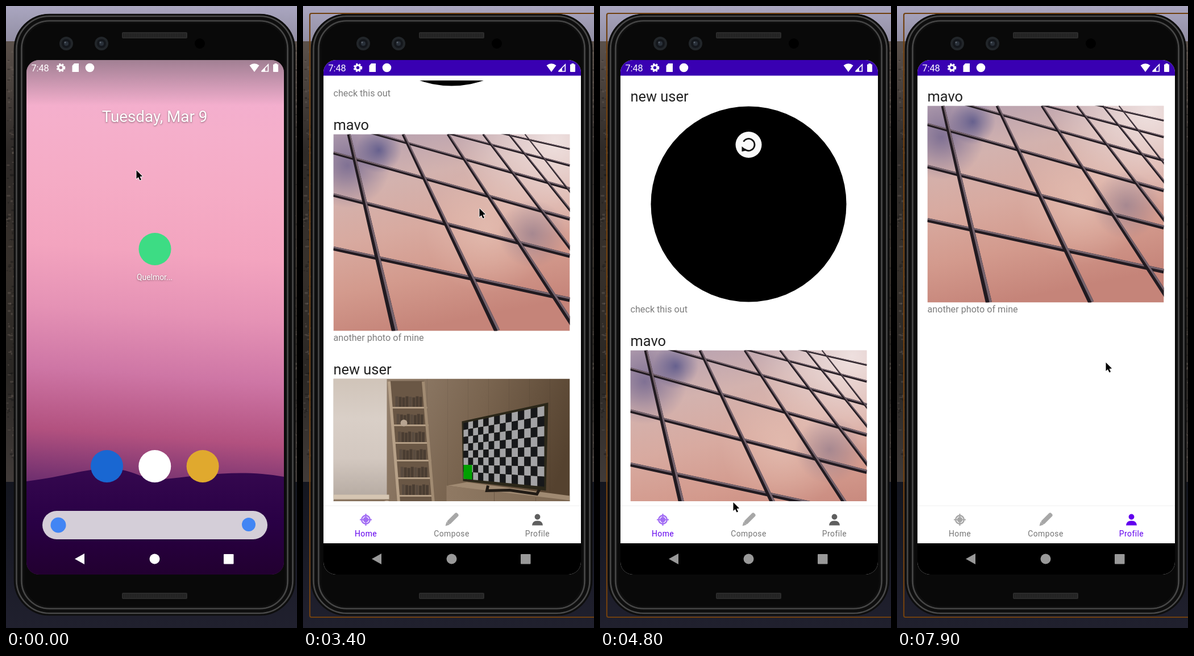
An HTML page with a canvas for the animation above (8000 ms loop, 512 px wide and 1094 px high).

```html
<!DOCTYPE html>
<html lang="en">
<head>
<meta charset="utf-8">
<title>Phone demo</title>
<style>
html, body { margin: 0; width: 100%; height: 100%; overflow: hidden; background: #17171f; }
canvas { display: block; width: 512px; height: 1094px; }
</style>
</head>
<body>
<canvas id="stage" width="512" height="1094"></canvas>
<script>
const c = document.getElementById('stage').getContext('2d');
const LOOP = 8000, STEP = 100;
const SCREEN = { x: 36, y: 95, w: 453, h: 905 };
const PHOTO = { x: 53.5, y: 175.5, w: 416, h: 346 };
const PURPLE = '#6200ee', BAR = '#3900b2', USER = 'mavo';
const clamp = v => Math.max(0, Math.min(1, v));
const mix = (a, b, p) => a + (b - a) * p;
const span = (t, from, to) => clamp((t - from) / (to - from));
const easeOut = p => 1 - (1 - p) ** 2;

// Pointer moves: start, end, then the place it reaches
const MOVES = [
  [100, 400, 257, 425], [1200, 1500, 285, 640], [1500, 2000, 312, 735], [3100, 3400, 310, 355],
  [3400, 4000, 300, 157], [4100, 4800, 234, 872], [4900, 5200, 262, 904], [5400, 5700, 249, 667],
  [5900, 6000, 257, 691], [6100, 6700, 416, 908], [7000, 7200, 367, 626]
];
const pointerAt = t => MOVES.reduce(([x, y], [from, to, nx, ny]) => {
  const p = span(t, from, to);
  return [mix(x, nx, p), mix(y, ny, p)];
}, [229, 288]);

// Drag, fling to the end, then drag back to the top
const scrollAt = t => (380 * span(t, 3100, 3400) + 161 * easeOut(span(t, 3400, 4000))) * (1 - span(t, 4100, 4650));

function gradient(x0, y0, x1, y1, ...colors) {
  const g = c.createLinearGradient(x0, y0, x1, y1);
  colors.forEach((color, i) => g.addColorStop(i / (colors.length - 1), color));
  return g;
}
function box(x, y, w, h, r, fill) {
  c.fillStyle = fill; c.beginPath(); c.roundRect(x, y, w, h, r); c.fill();
}
function outline(x, y, w, h, r, color, width) {
  c.strokeStyle = color; c.lineWidth = width; c.beginPath(); c.roundRect(x, y, w, h, r); c.stroke();
}
function disc(x, y, r, fill) {
  c.fillStyle = fill; c.beginPath(); c.arc(x, y, r, 0, 7); c.fill();
}
function ring(x, y, r, color, width, from = 0, to = 7) {
  c.strokeStyle = color; c.lineWidth = width; c.beginPath(); c.arc(x, y, r, from, to); c.stroke();
}
function trace(p) {
  c.beginPath();
  for (let i = 0; i < p.length; i += 2) c.lineTo(p[i], p[i + 1]);
}
function poly(fill, ...p) {
  trace(p); c.fillStyle = fill; c.fill();
}
function line(color, width, ...p) {
  trace(p); c.strokeStyle = color; c.lineWidth = width; c.stroke();
}
function glow(x, y, r, color) {
  const g = c.createRadialGradient(x, y, 0, x, y, r);
  g.addColorStop(0, color); g.addColorStop(1, color.slice(0, 7) + '00');
  disc(x, y, r, g);
}
function text(s, x, y, size, color, align = 'left', weight = 400, spacing = 0) {
  c.font = `${weight} ${size}px Roboto, sans-serif`;
  c.letterSpacing = spacing + 'px'; c.textAlign = align;
  c.fillStyle = color; c.fillText(s, x, y);
}
function clipped(x, y, w, h, r, draw) {
  c.save(); c.beginPath(); c.roundRect(x, y, w, h, r); c.clip(); draw(); c.restore();
}
function faded(alpha, draw) {
  if (alpha <= 0) return;
  c.save(); c.globalAlpha = alpha; draw(); c.restore();
}
function shadowed(color, blur, offset, draw) {
  c.save(); c.shadowColor = color; c.shadowBlur = blur; c.shadowOffsetY = offset; draw(); c.restore();
}

function desktop() {
  box(0, 0, 512, 70, 0, gradient(0, 0, 0, 70, '#aaa6c0', '#8f8ca0'));
  box(0, 62, 512, 775, 0, gradient(0, 62, 0, 837, '#5b514b', '#2e2a28', '#37312c', '#2a2724', '#413b39'));
  let seed = 7;
  const random = () => (seed = seed * 16807 % 2147483647) / 2147483647;
  for (let i = 0; i < 300; i++)
    box(random() < .6 ? random() * 16 : 496 + random() * 16, 70 + random() * 765, 2 + random() * 5, 1 + random() * 3, 1, i % 2 ? '#15131366' : '#6b615a66');
  box(0, 837, 512, 257, 0, gradient(0, 837, 0, 1094, '#14161f', '#20202e'));
}

function phone() {
  box(14, 14, 495, 1058, 62, '#080808');
  // Two soft metal rims
  for (let i = 0; i < 18; i++) {
    const v = 14 + 72 * Math.max(0, Math.sin((i - 2) * .7)) ** 2;
    outline(14.5 + i, 14.5 + i * .9, 494 - 2 * i, 1057 - 1.8 * i, 62 - i, `rgb(${v},${v},${v})`, 1.6);
  }
  box(32, 31, 459, 1024, 45, '#090909');
  for (const y of [46, 1032]) {
    box(204, y, 115, 11, 2, '#2b2b2b');
    for (let x = 207; x < 317; x += 3) line('#191919', 1, x, y + 2, x, y + 9);
  }
  for (const x of [106, 168]) {
    disc(x, 66, 12, '#22262a'); disc(x, 66, 8, '#14171c');
    disc(x, 66, 4, '#293039'); disc(x - 2, 64, 1.5, '#59616b');
  }
  disc(341, 66, 9, '#000');
}

function statusBar() {
  const white = '#fff';
  text('7:48', 44.5, 115, 16.2, white);
  ring(96.5, 108.5, 4.4, white, 3.4);
  c.setLineDash([3, 2.6]); ring(96.5, 108.5, 6.7, white, 2.2); c.setLineDash([]);
  poly(white, 120, 101, 128, 101, 128, 116, 116.5, 116, 116.5, 105);
  disc(147.5, 108.5, 7.8, white);
  c.fillStyle = white; c.beginPath(); c.moveTo(437, 116); c.lineTo(428.5, 104.5);
  c.quadraticCurveTo(437, 98, 445.5, 104.5); c.fill();
  line(white, 1.7, 449.5, 115, 461.3, 115, 461.3, 103, 449.5, 115);
  poly(white, 449, 115.5, 456, 108, 456, 115.5);
  box(470, 102.5, 9, 13.5, 1, white); box(472.5, 101, 4, 3, 0, white);
}

function systemButtons(color) {
  poly(color, 121, 972.5, 138, 963, 138, 982);
  disc(261.5, 972.5, 9, color);
  box(383, 964, 17.5, 17.5, 1, color);
}

function home(launch) {
  c.fillStyle = gradient(90, 95, 36, 850, '#f2aed0', '#f5afcb', '#f5abc5', '#f3a4bf', '#e592b5', '#ce76a5', '#b2517f', '#63296c');
  c.fillRect(36, 95, 453, 905);
  faded(1 - launch * 2, () => box(36, 95, 453, 80, 0, gradient(0, 95, 0, 175, '#6b606a99', '#6b606a00')));
  c.fillStyle = gradient(0, 815, 0, 1000, '#35084f', '#290045', '#220030');
  c.beginPath(); c.moveTo(36, 1000); c.lineTo(36, 836);
  c.bezierCurveTo(110, 827, 140, 812, 190, 814);
  c.bezierCurveTo(240, 819, 235, 837, 290, 831);
  c.bezierCurveTo(350, 824, 420, 815, 489, 828);
  c.lineTo(489, 1000); c.fill();

  faded(1 - launch * 1.23, () => shadowed('#0007', 3, 1, () =>
    text('Tuesday, Mar 9', 261.5, 204 - launch * 77, 27.8, '#fff', 'center')));
  faded(1 - launch * 2.5, () => {
    disc(262, 427.5, 28.5, '#3ddc84');
    shadowed('#0007', 3, 1, () => text('Quelmor...', 261.5, 482, 13.9, '#fff', 'center'));
    ['#1967d2', '#fff', '#e0a92e'].forEach((color, i) => disc(177.5 + i * 84.3, 809.5, 28.5, color));
    box(64, 888, 396, 50, 25, '#d4ced8');
    disc(92, 913, 13.5, '#4285f4');
    disc(427, 912, 12, '#4285f4');
  });
}

function beam(x0, y0, x1, y1, w0, w1) {
  const d = Math.hypot(x1 - x0, y1 - y0), nx = (y1 - y0) / d, ny = (x0 - x1) / d;
  const edge = k => [x0 + nx * w0 * k, y0 + ny * w0 * k, x1 + nx * w1 * k, y1 + ny * w1 * k];
  const strip = (color, a, b) => {
    const [p, q, r, s] = edge(b);
    poly(color, ...edge(a), r, s, p, q);
  };
  strip('#211a20', -.5, .5);
  strip('#75636d', .1, .5);
}

function facade() {
  box(0, 0, 416, 346, 0, gradient(60, 0, 130, 346, '#b8a2b0', '#d3b2ae', '#d8aaa0', '#d39a8d', '#c58479'));
  glow(25, 55, 75, '#5c5486aa');
  glow(80, 28, 40, '#3f4280aa');
  glow(390, 10, 170, '#f6ecebcc');
  glow(270, 170, 110, '#ecccbf88');
  glow(350, 175, 60, '#86748999');
  // Both families of bars close up with distance
  for (let i = 5; i >= 0; i--)
    beam(0, 201 - 104 * i + 10 * i * i, 416, 291 - 83 * i + 6 * i * i, 7 - i, 8 - i);
  for (let i = 5; i >= 0; i--)
    beam(27 + 104 * i - 8.4 * i * i, 0, 108 + 200 * i - 20 * i * i, 346, 6 - i * .8, 11 - i);
}

function room() {
  box(0, 0, 416, 346, 0, gradient(95, 0, 416, 120, '#94806d', '#79644f', '#55422f'));
  for (let x = 165; x < 416; x += 36) line('#0001', 1, x, 0, x, 200);
  poly(gradient(60, 230, 380, 330, '#a8957f', '#85725e', '#4b3c2d'), 0, 228, 180, 222, 416, 300, 416, 346, 0, 346);
  box(0, 0, 94, 210, 0, gradient(0, 0, 0, 210, '#d0c4b9', '#d9cfc7', '#d3c8c0', '#b5aaa1'));
  box(0, 204, 98, 8, 0, '#d5c5b2');
  box(0, 214, 100, 15, 0, '#816c56');
  for (const x of [30, 65, 100]) line('#8b775f', 1, x, 235, x - 28, 275);
  // Ladder shelf
  poly('#6a5745', 100, 4, 160, 4, 176, 222, 117, 230);
  for (let i = 0; i < 6; i++) {
    const y = 51 + i * 31, x = 103 + i * 2.3;
    for (let b = 0; b < 8; b++) box(x + 6 + b * 6, y - 20 + b % 3, 5, 19 - b % 3, 0, b % 4 ? '#4a3d32' : '#594b3f');
    line('#b39d84', 3, x, y, x + 62, y);
  }
  disc(124, 78, 6, '#b7a491');
  line('#b7a188', 5, 98, 5, 116, 230);
  line('#a18b72', 5, 158, 5, 176, 220);
  // Rug and cat
  poly('#54473a', 0, 281, 146, 263, 198, 285, 285, 346, 0, 346);
  poly('#8b7c6c88', 0, 300, 150, 275, 205, 300, 0, 325);
  c.fillStyle = '#b4a18e'; c.beginPath(); c.ellipse(102, 246, 12, 17, -.25, 0, 7); c.fill();
  disc(94, 222, 8, '#b9a692');
  // Cabinet
  poly('#a08a72', 201, 188, 235, 182, 416, 206, 416, 218);
  poly(gradient(200, 0, 416, 0, '#8f7963', '#7b6650'), 199, 188, 416, 214, 416, 298, 356, 310, 199, 248);
  for (const x of [283, 356]) line('#6c5845', 1, x, x * .13 + 163, x, x * .38 + 173);
  for (const x of [206, 348, 402]) poly('#a18a70', x, 250, x + 12, 250, x + 7, x * .3 + 214, x + 3, x * .3 + 214);
  // Television
  line('#211b15', 5, 272, 188, 270, 197, 310, 196, 358, 203, 365, 190);
  poly('#2b2719', 226, 75, 378, 42, 374, 197, 228, 180);
  const cols = 14, rows = 8;
  const corner = (i, j) => {
    const u = i / cols * (.8 + .2 * i / cols);
    return [mix(229, 371, u), mix(mix(78, 48, u), mix(176, 190, u), j / rows)];
  };
  const cell = (i, j, w, h, color) =>
    poly(color, ...corner(i, j), ...corner(i + w, j), ...corner(i + w, j + h), ...corner(i, j + h));
  for (let i = 0; i < cols; i++) for (let j = 0; j < rows; j++) cell(i, j, 1, 1, (i + j) % 2 ? '#a3a3a5' : '#17181a');
  cell(0, rows - 2, 1.8, 2, '#00a000');
}

const emblem = () => disc(208, 173, 172, '#000');

const POSTS = [
  { user: 'new user', caption: 'check this out', picture: emblem, ready: 2100 },
  { user: USER, caption: 'another photo of mine', picture: facade, ready: 2300 },
  { user: 'new user', caption: 'my photo!', picture: room, ready: 2400 }
];

function feed(posts, scroll, t) {
  clipped(36, 131, 453, 740, 0, () => posts.forEach((post, i) => {
    const y = 430 * i - scroll;
    text(post.user, 53.5, 168 + y, 25.4, '#212121');
    if (t >= post.ready) clipped(PHOTO.x, PHOTO.y + y, PHOTO.w, PHOTO.h, 0, () => {
      c.translate(PHOTO.x, PHOTO.y + y);
      post.picture();
    });
    text(post.caption, 53.5, 539 + y, 16.17, '#7d7d7d');
  }));
}

function spinner(t) {
  if (t < 4700 || t >= 5300) return;
  const size = 1 - span(t, 5150, 5300);
  c.save();
  c.translate(261.5, mix(170, 244, span(t, 4700, 4800))); c.scale(size, size);
  shadowed('#0004', 6, 2, () => disc(0, 0, 23, '#fafafa'));
  c.rotate(Math.max(0, t - 4800) / 160);
  ring(0, 0, 10.5, '#111', 2.7, -2.6, 2.35);
  poly('#111', -12, 3, -12, 12, -3, 10);
  c.restore();
}

function compose() {
  const button = (label, y, w) => {
    shadowed('#0005', 2, 1, () => box(36, y, w, 41, 4, PURPLE));
    text(label, 36.7 + w / 2, y + 27, 16.17, '#fff', 'center', 500, 1.44);
  };
  text('Description', 39.5, 156, 20.8, '#9c9c9c');
  line('#8b8b8b', 1.2, 40, 164.3, 484, 164.3);
  button('TAKE PICTURE', 181.5, 453);
  button('SUBMIT', 485, 453);
  button('LOGOUT', 540.5, 106);
}

function tabs(active) {
  box(36, 878.5, 453, 1.2, 0, '#eee');
  box(36, 879.5, 453, 65.5, 0, '#fff');
  const tint = i => i === active ? '#a26df4' : '#a7a7a7';
  ['Home', 'Compose', 'Profile'].forEach((label, i) =>
    text(label, 110.5 + i * 151, 933, 13.9, i === active ? PURPLE : '#757575', 'center', 400, .45));
  line(tint(0), 2.2, 100, 903.5, 121, 903.5);
  line(tint(0), 2.2, 110.5, 893, 110.5, 914);
  ring(110.5, 903.5, 7.3, tint(0), 2.4);
  disc(110.5, 903.5, 4.8, tint(0));
  c.save(); c.translate(261.5, 903.5); c.rotate(-Math.PI / 4);
  box(-9, -3.8, 24, 7.6, 3, tint(1)); poly(tint(1), -9, -3.8, -15.5, 0, -9, 3.8);
  c.restore();
  const person = active === 2 ? PURPLE : '#5f5f5f';
  disc(412.5, 898.5, 4.9, person);
  box(403, 905.5, 19, 8, [8, 8, 0, 0], person);
}

function appWindow() {
  box(36, 95, 453, 905, 0, '#fff');
  box(36, 95, 453, 27.5, 0, BAR);
  box(36, 945, 453, 55, 0, '#000');
}

function app(t) {
  appWindow();
  if (t < 1800) return;
  const tab = t < 5400 ? 0 : t < 6800 ? 1 : 2;
  if (tab === 0 && t >= 2000) { feed(POSTS, scrollAt(t), t); spinner(t); }
  if (tab === 1) compose();
  if (tab === 2 && t >= 7900) feed([POSTS[1]], 0, t);
  tabs(tab);
}

// The app grows out of its icon to fill the screen
function launching(p) {
  const ease = easeOut(p);
  const x = mix(233, SCREEN.x, ease), w = mix(57, SCREEN.w, ease);
  const y = mix(399, SCREEN.y, 1 - (1 - p) ** 1.45), bottom = mix(456, 1000, ease);
  clipped(x, y, w, bottom - y, mix(28, 14, ease), () => {
    c.translate(x, y); c.scale(w / SCREEN.w, w / SCREEN.w); c.translate(-SCREEN.x, -SCREEN.y);
    appWindow();
  });
}

function pointer(x, y) {
  c.save(); c.translate(x + .5, y + 1);
  c.lineJoin = 'round';
  const arrow = [0, 0, 0, 15, 3.4, 12, 6, 17.5, 8.5, 16.4, 6, 11, 10.6, 10.6];
  line('#fff', 1.8, ...arrow, 0, 0);
  poly('#000', ...arrow);
  c.restore();
}

function draw(t) {
  const launch = span(t, 1250, 1635);
  desktop();
  phone();
  clipped(SCREEN.x, SCREEN.y, SCREEN.w, SCREEN.h, 22, () => {
    if (launch < 1) home(launch); else app(t);
    if (launch > 0 && launch < 1) launching(launch);
    statusBar();
    systemButtons(launch < 1 ? '#fff' : '#999');
  });
  if (t >= 1200) outline(12, 13, 520, 1062, 3, '#70400f', 2.2);
  pointer(...pointerAt(t));
}

function tick() {
  draw(Math.floor(performance.now() % LOOP / STEP) * STEP);
  requestAnimationFrame(tick);
}
tick();
</script>
</body>
</html>
```
